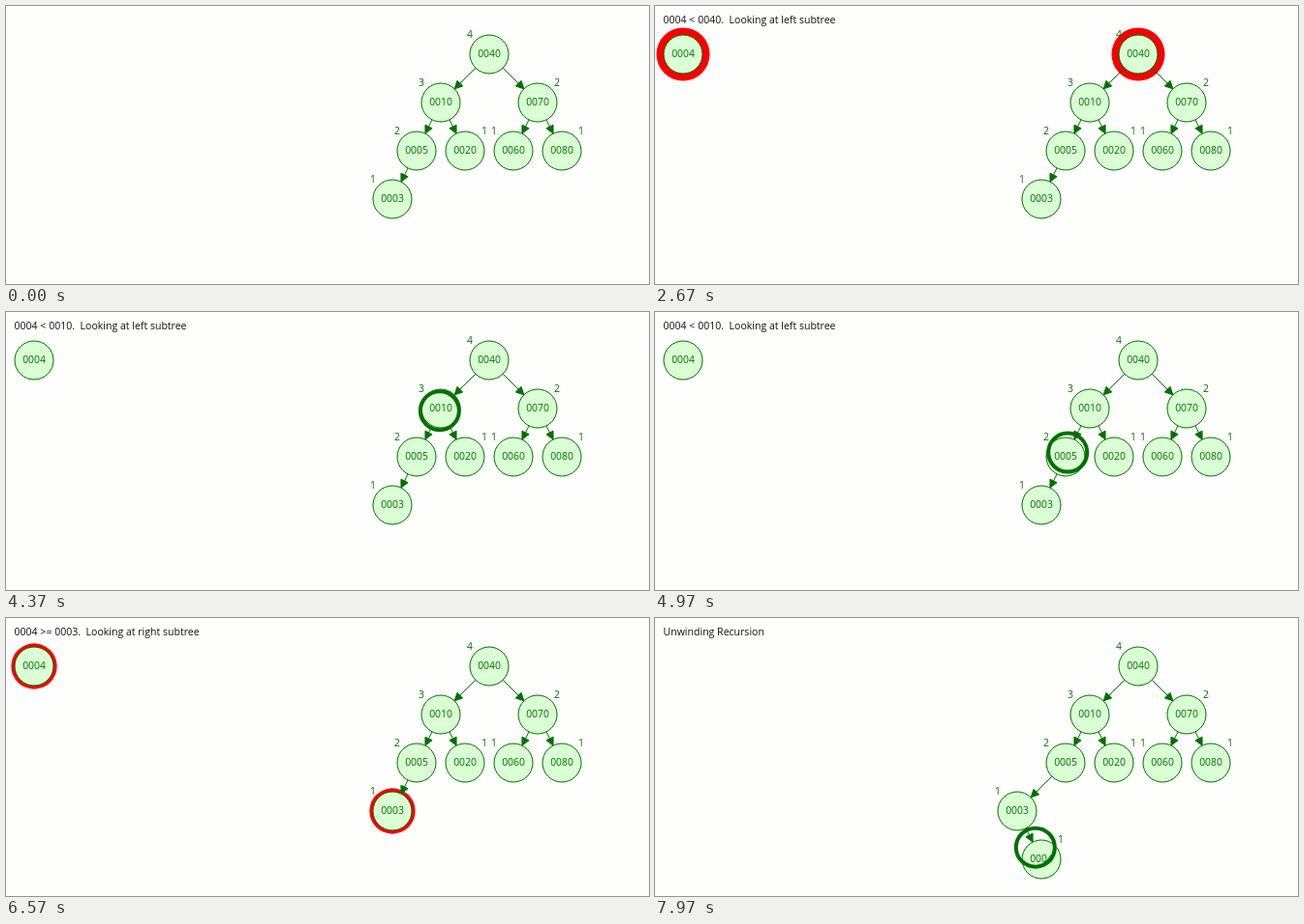
Write an HTML page that moves like this. It is 664 by 288 pixels and loops after 8000 ms.

```html
<!DOCTYPE html>
<html lang="en">
<head>
<meta charset="utf-8">
<title>AVL tree insertion</title>
<style>
  html, body { margin: 0; width: 100%; height: 100%; overflow: hidden; background: #fefefc; }
  svg { display: block; width: 664px; height: 288px; }
  text { font: 10.4px "Open Sans", "Noto Sans", sans-serif; fill: #007000; text-anchor: middle; white-space: pre; }
  #message { font-size: 10.55px; fill: #111; text-anchor: start; }
  .node { fill: #dbffd4; stroke: #007000; }
  .edge { fill: #007000; stroke: #007000; }
  .halo { fill: #f80000; }
  #ring { fill: none; stroke: #007000; stroke-width: 4; }
</style>
</head>
<body>
<svg viewBox="0 0 664 288">
  <g id="halos"></g>
  <g id="edges"></g>
  <g id="nodes"></g>
  <circle id="ring" r="20"/>
  <text id="message" y="18"></text>
</svg>
<script>
const LOOP = 8000, R = 20;
const APPEAR = 1530;
// Start times of the algorithm's steps
const STEPS = [2300, 3006, 3673, 4340, 5032, 5724, 6416, 7108, 7800, 8492];
const INSERT = 7, UNWIND = 8;
const $ = id => document.getElementById(id);

function add(parent, tag, attrs) {
  const el = document.createElementNS("http://www.w3.org/2000/svg", tag);
  set(el, attrs);
  return parent.appendChild(el);
}
function set(el, attrs) {
  for (const key in attrs) el.setAttribute(key, attrs[key]);
}
function show(el, on) {
  el.style.display = on ? "" : "none";
}

// key, x, y, height, side of the height label, parent
const nodes = {};
[
  ["0040", 499, 50, 4, -1],
  ["0010", 449, 100, 3, -1, "0040"],
  ["0070", 549, 100, 2, 1, "0040"],
  ["0005", 424, 150, 2, -1, "0010"],
  ["0020", 474, 150, 1, 1, "0010"],
  ["0060", 524, 150, 1, -1, "0070"],
  ["0080", 574, 150, 1, 1, "0070"],
  ["0003", 399, 200, 1, -1, "0005"],
  ["0004", 29, 50, 1, 1, "0003"]
].forEach(([key, x, y, height, side, parent]) => {
  const g = add($("nodes"), "g", {});
  add(g, "circle", { class: "node", r: R });
  add(g, "text", { y: 3.3 }).textContent = key;
  const label = add(g, "text", { x: side * R, y: -16.7 });
  label.textContent = height;
  nodes[key] = {
    x, y, g, label, parent,
    halo: add($("halos"), "circle", { class: "halo" }),
    edge: parent && add($("edges"), "path", { class: "edge" })
  };
});

const path = ["0040", "0010", "0005", "0003"];
const fresh = nodes["0004"], shifted = nodes["0003"];

const mix = (a, b, p) => a + (b - a) * p;
const between = (a, b, p) => ({ x: mix(a.x, b.x, p), y: mix(a.y, b.y, p) });

function arrow(a, b) {
  const d = Math.hypot(b.x - a.x, b.y - a.y) || 1;
  const ux = (b.x - a.x) / d, uy = (b.y - a.y) / d;
  const at = (along, off) =>
    `${a.x + ux * along - uy * off} ${a.y + uy * along + ux * off}`;
  const tip = d - R;
  return `M${at(R, 0)}L${at(tip, 0)}L${at(tip - 8, 4)}L${at(tip - 8, -4)}L${at(tip, 0)}`;
}

function caption(t, step) {
  if (t < APPEAR) return "";
  if (step < 0) return "Inserting 0004";
  if (step === INSERT) return "Found null tree, inserting element";
  if (step >= UNWIND) return "Unwinding Recursion";
  const key = path[step >> 1];
  return key > "0004"
    ? `0004 < ${key}.  Looking at left subtree`
    : `0004 >= ${key}.  Looking at right subtree`;
}

// Highlight swells and shrinks between 3 and 8 px
function haloRadius(t) {
  const period = 2420, thinnest = 6410;
  const phase = (t - thinnest + 3 * period) % period / period;
  return R + 3 + 10 * Math.min(phase, 1 - phase);
}

function draw(t) {
  let step = -1;
  while (step < UNWIND && t >= STEPS[step + 1]) step++;
  const p = step < 0 ? 0 : (t - STEPS[step]) / (STEPS[step + 1] - STEPS[step]);

  const settled = step < INSERT ? 0 : step === INSERT ? p : 1;
  Object.assign(fresh, between({ x: 29, y: 50 }, { x: 399, y: 250 }, settled));
  shifted.x = mix(399, 374, settled);

  const comparing = step >= 0 && step < INSERT && step % 2 === 0;
  const descending = step > 0 && step < INSERT && step % 2 === 1;
  const target = comparing ? nodes[path[step >> 1]] : null;
  const r = haloRadius(t);

  for (const n of Object.values(nodes)) {
    set(n.g, { transform: `translate(${n.x} ${n.y})` });
    const lit = comparing && (n === fresh || n === target);
    show(n.halo, lit);
    if (lit) set(n.halo, { cx: n.x, cy: n.y, r });
    if (n.edge) set(n.edge, { d: arrow(nodes[n.parent], n) });
  }
  show(fresh.g, t >= APPEAR);
  show(fresh.label, step >= INSERT);
  show(fresh.edge, step >= INSERT);

  const ring = $("ring");
  const ringOn = descending || step === UNWIND;
  show(ring, ringOn);
  if (ringOn) {
    const i = step >> 1;
    const c = descending
      ? between(nodes[path[i]], nodes[path[i + 1]], p)
      : between(fresh, shifted, p);
    set(ring, { cx: c.x, cy: c.y });
  }

  const message = $("message");
  message.textContent = caption(t, step);
  set(message, { x: step < 0 ? 11 : 8.5 });
}

const start = performance.now();
function tick() {
  draw((performance.now() - start) % LOOP);
  requestAnimationFrame(tick);
}
tick();
</script>
</body>
</html>
```
